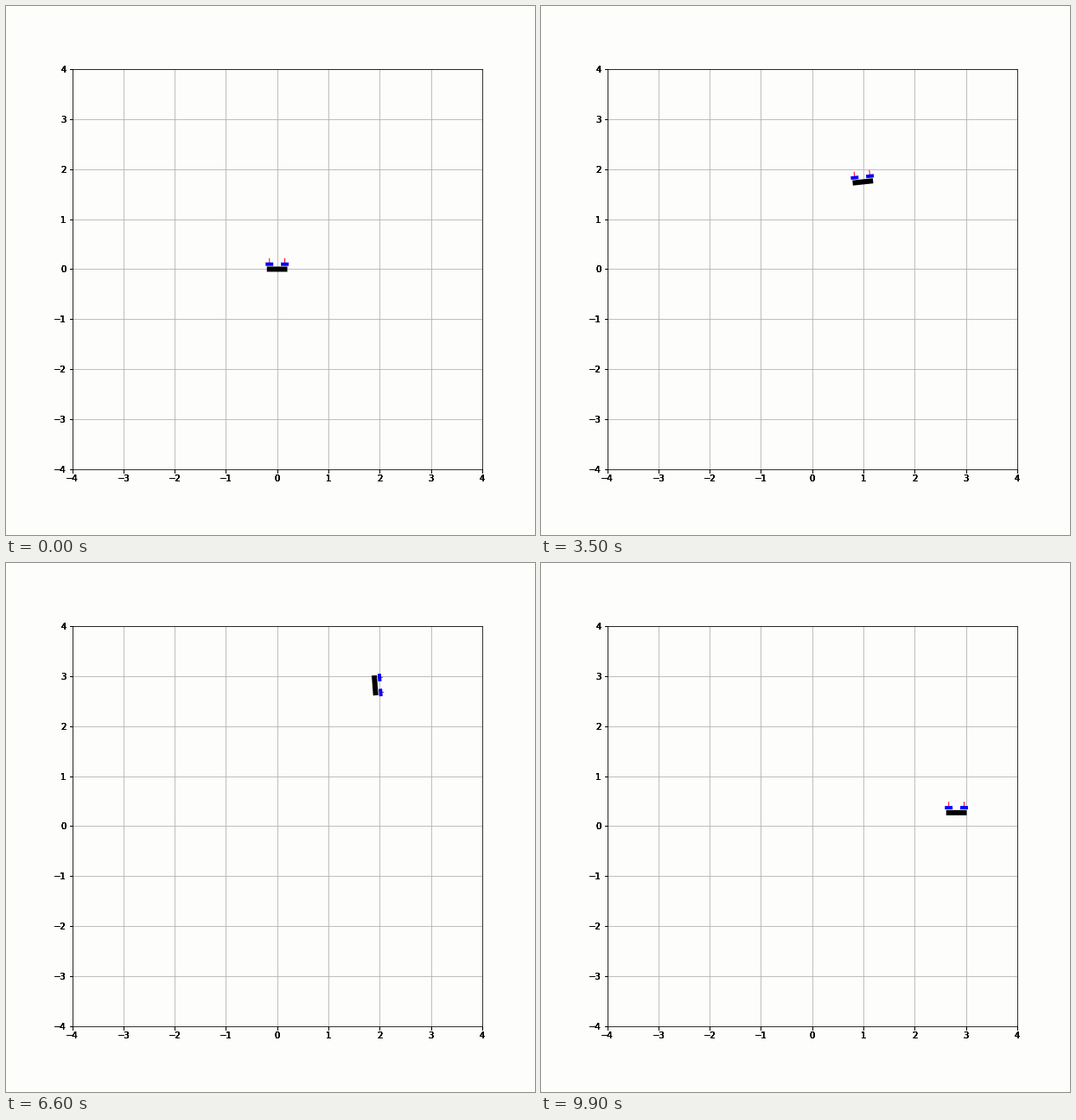
Animation, 612 px wide and 612 px high, one loop 10000 ms. Source, as a matplotlib script:

```python
import numpy as np
import matplotlib.pyplot as plt
from matplotlib.animation import FuncAnimation

FRAMES, INTERVAL = 100, 100
BOX = [0.125, 0.125, 0.775, 0.755]
PAPER = "#fdfdfb"


def ease(t, mid, width):
    return 1 / (1 + np.exp((mid - t) / width))


def bump(t, mid, width):
    return np.exp(-((t - mid) / width) ** 2)


def loops(t):
    """Offset of the two counter-clockwise loops around the drifting path."""
    turn = 2 * np.pi * (ease(t, 42, 3.5) + ease(t, 62, 3.5))
    return np.stack([0.4 * np.sin(turn), 0.5 * (1 - np.cos(turn))], axis=-1)


def heading(t):
    """Two full flips plus a slight lean before and after them."""
    flips = 360 * (ease(t, 45.7, 3) + ease(t, 62.5, 3))
    lean = 3 * bump(t, 83, 8) - 5.5 * bump(t, 27, 13)
    return np.radians(flips + lean)


# Way points of the flight; the drift is what remains without the loops
WHEN = np.array([0, 11, 27, 43, 55, 66, 83, 99])
WHERE = np.array([(0, 0), (0.05, 0.23), (0.444, 1.10), (0.87, 3.03),
                  (1.72, 2.6), (1.91, 2.82), (2.70, 0.758), (2.816, 0.27)])
DRIFT = WHERE - loops(WHEN)
SLOPE = np.gradient(DRIFT, WHEN, axis=0)


def position(t):
    i = min(np.searchsorted(WHEN, t, side="right"), len(WHEN) - 1) - 1
    h = WHEN[i + 1] - WHEN[i]
    s = (t - WHEN[i]) / h
    r = 1 - s
    drift = (r * r * ((1 + 2 * s) * DRIFT[i] + s * h * SLOPE[i])
             + s * s * ((1 + 2 * r) * DRIFT[i + 1] - r * h * SLOPE[i + 1]))
    return drift + loops(t)


fig = plt.figure(figsize=(8.5, 8.5), dpi=72, facecolor=PAPER)


def make_axes(label, **kwargs):
    axes = fig.add_axes(BOX, label=label, **kwargs)
    axes.set(xlim=(-4, 4), ylim=(-4, 4),
             xticks=range(-4, 5), yticks=range(-4, 5))
    return axes


ax = make_axes("main", facecolor=PAPER)
ax.grid(True)
# Stacked copies give the tick labels their heavy edges
for k in range(5):
    make_axes(f"overlay{k}", frameon=False)


def segment(color, width):
    return ax.plot([], [], color=color, lw=width, solid_capstyle="butt")[0]


jets = [segment("red", 1) for _ in range(2)]
body = segment("black", 6)
rotors = [segment("blue", 4) for _ in range(2)]


def update(step):
    x, y = position(step)
    angle = heading(step)
    c, s = np.cos(angle), np.sin(angle)
    thrust = 0.06 * (1 + c)

    def place(line, u, v):
        u, v = np.array(u), np.array(v)
        line.set_data(x + c * u - s * v, y + s * u + c * v)

    place(body, [-0.2, 0.2], [0, 0])
    for side, rotor, jet in zip((-0.15, 0.15), rotors, jets):
        place(rotor, [side - 0.075, side + 0.075], [0.1, 0.1])
        place(jet, [side, side], [0.1, 0.1 + thrust])
    return [body, *rotors, *jets]


anim = FuncAnimation(fig, update, frames=FRAMES, interval=INTERVAL,
                     repeat=True, repeat_delay=0, blit=False)
plt.show()
```
